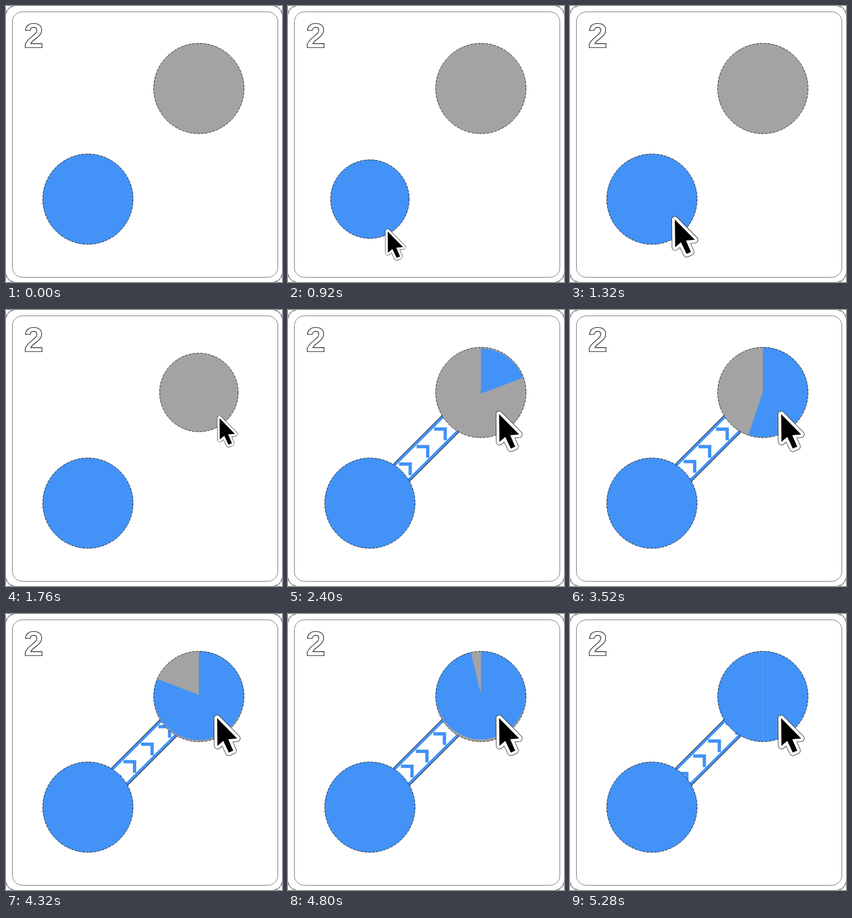
Animation of 498 by 498 pixels, one loop 5320 ms. Source, as an HTML page with a canvas:

```html
<!DOCTYPE html>
<html lang="en">
<head>
<meta charset="utf-8">
<title>Connect two nodes</title>
<style>
  html, body { margin: 0; width: 100%; height: 100%; overflow: hidden; background: #fff; }
  canvas { display: block; width: 498px; height: 498px; }
</style>
</head>
<body>
<canvas id="stage" width="498" height="498"></canvas>
<script>
const ctx = document.getElementById('stage').getContext('2d');
const LOOP = 5320, STEP = 40;
const BLUE = '#4292f7', GREY = '#a3a3a3', INK = '#111';
const RADIUS = 81.5;
const source = { x: 147.8, y: 348.5 }, sink = { x: 348, y: 148.8 };
const LINK_TIME = 1800, FILL_RATE = 0.1155;

const easeInOut = p => p < 0.5 ? 4 * p ** 3 : 1 - (2 - 2 * p) ** 3 / 2;
const smooth = p => p * p * (3 - 2 * p);

// Interpolates a table of [time, value] steps.
function track(keys, t, ease) {
  if (t <= keys[0][0]) return keys[0][1];
  for (let i = 1; i < keys.length; i++) {
    const [t0, a] = keys[i - 1], [t1, b] = keys[i];
    if (t < t1) return a + (b - a) * ease((t - t0) / (t1 - t0));
  }
  return keys[keys.length - 1][1];
}

// 0 at rest, 1 fully pressed, negative on the rebound.
const press = (start, t) =>
  track([[0, 0], [120, 1], [160, 1], [320, -0.35], [440, 0]], t - start, smooth);

const travel = (start, peak, end, t) =>
  track([[start, 0], [peak, 1.07], [end, 1]], t, easeInOut);

const mix = (a, b, p) => ({ x: a.x + (b.x - a.x) * p, y: a.y + (b.y - a.y) * p });

function pointerAt(t) {
  const outside = { x: 530, y: 545 }, first = { x: 194.5, y: 431.5 }, second = { x: 400, y: 220 };
  return t < 1240
    ? mix(outside, first, travel(240, 680, 800, t))
    : mix(first, second, travel(1240, 1560, 1640, t));
}

function stroke(color, width, dash = []) {
  ctx.setLineDash(dash);
  ctx.strokeStyle = color;
  ctx.lineWidth = width;
  ctx.stroke();
  ctx.setLineDash([]);
}

function line(x1, y1, x2, y2, color, width) {
  ctx.beginPath();
  ctx.moveTo(x1, y1);
  ctx.lineTo(x2, y2);
  stroke(color, width);
}

function roundBox(x, y, size, color) {
  ctx.beginPath();
  ctx.roundRect(x, y, size, size, 18);
  stroke(color, 1);
}

function drawCard() {
  ctx.fillStyle = '#fff';
  ctx.fillRect(0, 0, 498, 498);
  roundBox(-0.5, -0.5, 499, INK);
  roundBox(11.5, 10.5, 479, '#707070');
  ctx.font = 'bold 63px "Liberation Sans", Arial, sans-serif';
  ctx.strokeStyle = INK;
  ctx.lineWidth = 1.1;
  ctx.strokeText('2', 32.4, 74.5);
}

function drawChevrons(t) {
  const gap = 31.6, count = 5, period = 4 * gap + 27;
  const lead = 255 + 0.3585 * (t - 3520);
  ctx.lineJoin = 'miter';
  for (let i = 0; i < count; i++) {
    const offset = lead + i * gap - 180;
    const x = 180 + ((offset % period) + period) % period;
    const y = 498.5 - x;
    ctx.beginPath();
    ctx.moveTo(x - 23, y + 3);
    ctx.lineTo(x - 3, y + 3);
    ctx.lineTo(x - 3, y + 23);
    stroke(BLUE, 6);
  }
}

function drawPipe(t) {
  drawChevrons(t);
  ctx.save();
  ctx.translate(source.x + 0.9, source.y + 0.9);
  ctx.rotate(Math.atan2(sink.y - source.y, sink.x - source.x));
  const length = Math.hypot(sink.x - source.x, sink.y - source.y);
  for (const side of [-1, 1]) {
    line(0, side * 18.6, length, side * 18.6, BLUE, 4.8);
    line(0, side * 21.4, length, side * 21.4, INK, 1);
  }
  ctx.restore();
}

// The wedge's centre drifts upward slightly as it sweeps round.
function drawWedge(x, y, r, angle) {
  const top = -Math.PI / 2;
  const cy = y + 3.8 - angle * 0.0226;
  ctx.save();
  ctx.clip();
  ctx.beginPath();
  ctx.moveTo(x, cy);
  ctx.arc(x, cy, r, top, top + angle * Math.PI / 180);
  ctx.fillStyle = BLUE;
  ctx.fill();
  ctx.restore();
}

function drawNode({ x, y }, color, scale, angle = 0) {
  const r = RADIUS * scale, full = angle >= 360;
  const disc = () => {
    ctx.beginPath();
    ctx.arc(x, y, r, 0, 2 * Math.PI);
  };
  disc();
  ctx.fillStyle = full ? BLUE : color;
  ctx.fill();
  if (full) line(x - 0.5, y - r, x - 0.5, y + r, '#5c9ff5', 1);
  else if (angle > 0) drawWedge(x, y, r, angle);
  disc();
  stroke(INK, 0.9, [5, 2]);
}

function drawPointer({ x, y }, scale) {
  const shape = [[-19, -32], [-18.5, 18], [-8, 9], [2, 30], [10, 26.5], [1, 6], [17, 4.5]];
  ctx.save();
  ctx.translate(x, y);
  ctx.scale(scale, scale);
  ctx.beginPath();
  shape.forEach(([px, py]) => ctx.lineTo(px, py));
  ctx.closePath();
  ctx.lineJoin = 'round';
  stroke(INK, 12.2);
  stroke('#fff', 10.6);
  ctx.fillStyle = '#000';
  ctx.fill();
  ctx.restore();
}

function draw(t) {
  const sourcePress = press(800, t), sinkPress = press(1640, t);
  const linked = t >= LINK_TIME;
  drawCard();
  if (linked) drawPipe(t);
  drawNode(source, BLUE, 1 - 0.13 * sourcePress);
  drawNode(sink, GREY, 1 - 0.13 * sinkPress, linked ? (t - LINK_TIME) * FILL_RATE : 0);
  if (t >= 240) drawPointer(pointerAt(t), 1 - 0.23 * (sourcePress + sinkPress));
}

const begin = performance.now();
function tick() {
  const t = (performance.now() - begin) % LOOP;
  draw(Math.floor(t / STEP) * STEP);
  requestAnimationFrame(tick);
}
tick();
</script>
</body>
</html>
```
